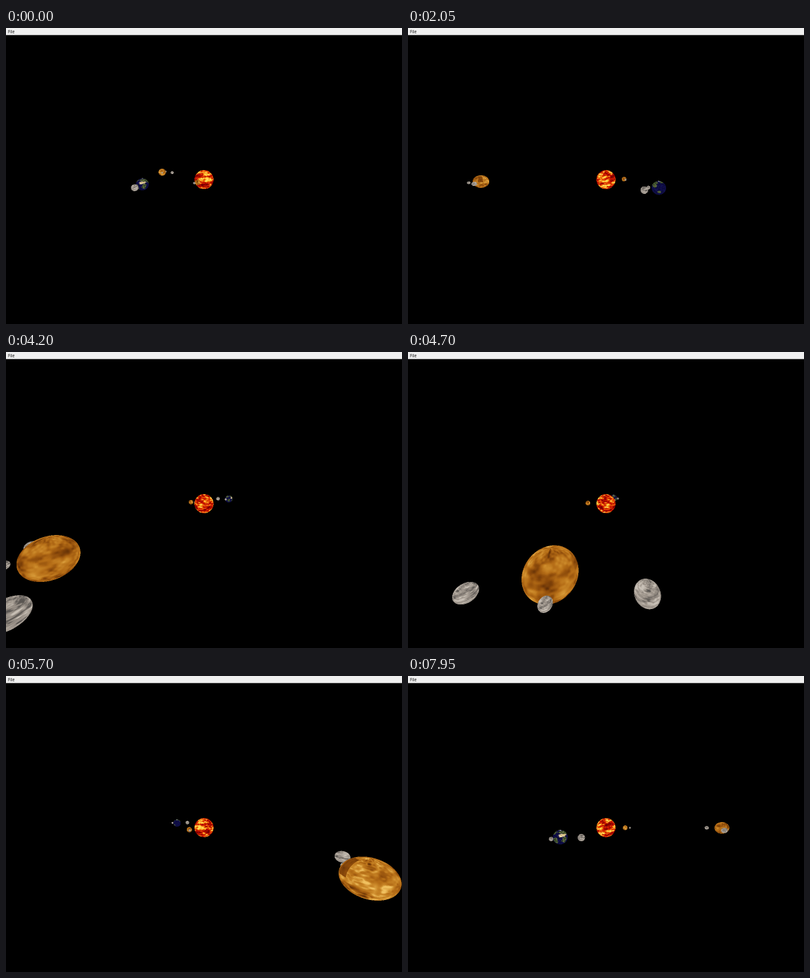
These frames come from a looping animation (600x448 px, 8000 ms). An HTML page with a canvas:

```html
<!DOCTYPE html>
<html lang="en">
<head>
<meta charset="utf-8">
<title>Solar system</title>
<style>
  html, body { margin: 0; width: 100%; height: 100%; overflow: hidden; background: #000; }
  #stage { position: absolute; left: 0; top: 0; width: 600px; height: 448px; }
  canvas { position: absolute; left: 0; top: 11px; }
  #menu {
    position: absolute; left: 0; top: 0; width: 600px; height: 10px;
    background: #f0f0f0; border-bottom: 1px solid #a8a8a8;
    font: 6.3px/11px "Open Sans", "Noto Sans", sans-serif; color: #000;
  }
  #menu span { position: absolute; left: 3px; top: 0; }
</style>
</head>
<body>
<div id="stage">
  <div id="menu"><span>File</span></div>
  <canvas id="space" width="600" height="437"></canvas>
</div>
<script>
const W = 600, H = 437, LOOP = 8000, STEP = 50;
const FOCAL = H / 2;                      // 90 degree vertical field of view
const CAM_Y = 2, CAM_Z = 15, DIST = Math.hypot(CAM_Y, CAM_Z);
const SIN = CAM_Y / DIST, COS = CAM_Z / DIST;
const RAD = Math.PI / 180;

const ctx = document.getElementById("space").getContext("2d");
const image = ctx.createImageData(W, H);
const px = image.data;

// ---- textures ----
const TW = 256, TH = 128;

function hash(x, y, seed) {
  const v = Math.sin(x * 127.1 + y * 311.7 + seed * 74.7) * 43758.5453;
  return v - Math.floor(v);
}

// Value noise over u, v in 0..1 that wraps around in u.
function noise(u, v, nx, ny, seed) {
  const x = u * nx, y = v * ny, ix = Math.floor(x), iy = Math.floor(y);
  const ease = f => f * f * (3 - 2 * f);
  const fx = ease(x - ix), fy = ease(y - iy);
  const at = (i, j) => hash(((ix + i) % nx + nx) % nx, iy + j, seed);
  const top = at(0, 0) + (at(1, 0) - at(0, 0)) * fx;
  const low = at(0, 1) + (at(1, 1) - at(0, 1)) * fx;
  return top + (low - top) * fy;
}

function cloud(u, v, nx, ny, seed) {
  return 0.45 * noise(u, v, nx, ny, seed)
    + 0.3 * noise(u, v, nx * 2, ny * 2, seed + 1)
    + 0.25 * noise(u, v, nx * 4, ny * 4, seed + 2);
}

// Colour from a list of evenly spaced stops.
function ramp(stops, k) {
  const p = Math.min(0.9999, Math.max(0, k)) * (stops.length - 1);
  const i = Math.floor(p), f = p - i;
  return stops[i].map((c, n) => c + (stops[i + 1][n] - c) * f);
}

const contrast = (k, gain) => 0.5 + (k - 0.5) * gain;

// u = 0.5 is longitude 0, v = 0 is the north pole.
function makeTexture(shade) {
  const data = new Uint8ClampedArray(TW * TH * 3);
  for (let j = 0; j < TH; j++)
    for (let i = 0; i < TW; i++)
      data.set(shade(i / TW, j / TH), (j * TW + i) * 3);
  return data;
}

const FIRE = [[120, 0, 0], [170, 5, 0], [205, 22, 0], [228, 70, 5], [250, 160, 25], [255, 225, 90]];
const AMBER = [[85, 40, 5], [140, 74, 10], [180, 108, 22], [204, 138, 42], [240, 192, 95]];
const STONE = [[90, 86, 82], [140, 132, 124], [166, 157, 147], [200, 192, 182]];

const sunTex = makeTexture((u, v) => ramp(FIRE, contrast(cloud(u + v * 0.2, v, 13, 14, 3), 2.3)));

// Bright veins cover one side, a dark wedge marks the other.
const amberTex = makeTexture((u, v) => {
  const k = contrast(cloud(u, v, 12, 8, 11), 1.2) - 0.04;
  const side = Math.max(0, Math.cos((u - 0.67) * 2 * Math.PI));
  const vein = 1 - Math.abs(2 * cloud(u, v, 9, 8, 15) - 1) * 4;
  const wedge = v > 0.15 && v < 0.5 && Math.abs(u - 0.5) < 0.05;
  return ramp(AMBER, wedge ? k * 0.35 : k + 0.35 * side * Math.max(0, vein));
});

const stoneTex = makeTexture((u, v) => ramp(STONE, contrast(cloud(u, v, 9, 16, 31), 2.2)));

// Land masses: longitude, latitude, half width, half height.
const DESERT = [0, 24, 36, 15];
const LAND = [
  [14, -8, 22, 28], [40, 52, 75, 20], [85, 25, 25, 16], [135, -25, 18, 12],
  [-100, 48, 38, 20], [-62, -15, 20, 28], [180, 62, 40, 12]
];

const earthTex = makeTexture((u, v) => {
  const lon = (u - 0.5) * 360, lat = 90 - v * 180;
  const rough = (cloud(u, v, 14, 10, 41) - 0.5) * 1.2;
  const inside = ([x, y, w, h]) => {
    const d = Math.abs(lon - x), wrap = Math.min(d, 360 - d);
    return Math.hypot(wrap / w, (lat - y) / h) + rough < 1;
  };
  const n = noise(u, v, 40, 24, 47);
  if (Math.abs(lat) > 78) return [190, 195, 200];
  if (inside(DESERT)) return ramp([[190, 165, 105], [245, 230, 185]], n);
  if (LAND.some(inside)) return ramp([[28, 48, 22], [70, 88, 48], [145, 135, 92]], n);
  return ramp([[8, 8, 48], [20, 18, 88]], n);
});

// ---- bodies: orbit radius, size, start angle and speed in degrees (per second) ----
const body = (tex, orbit, size, start, speed, turn, spin, moons = []) =>
  ({ tex, orbit, size, start, speed, turn, spin, moons });
const moon = (orbit, size, start, speed) => body(stoneTex, orbit, size, start, speed, 0, 70);

const system = body(sunTex, 0, 1, 0, 0, 20, 55, [
  body(amberTex, 2, 0.25, -17.5, 58.5, 0, 80, [
    moon(0.5, 0.1, -32, 196.5)
  ]),
  body(earthTex, 6, 0.5, -59.8, 48.76, 23, 92, [
    moon(0.73, 0.14, -137.8, 194),
    moon(1.5, 0.25, 2.5, 146.2)
  ]),
  body(amberTex, 12, 0.6, -143.4, 29.25, -83, 58.5, [
    moon(0.9, 0.12, 16.5, 152.6),
    moon(1.5, 0.18, -186.9, 102.4),
    moon(2.1, 0.24, 65, 78.2)
  ])
]);

function place(b, cx, cz, t, out) {
  const a = (b.start + b.speed * t) * RAD;
  const x = cx + b.orbit * Math.sin(a), z = cz + b.orbit * Math.cos(a);
  out.push({ tex: b.tex, r: b.size, spin: b.turn + b.spin * t, x, y: z * SIN, d: DIST - z * COS });
  b.moons.forEach(m => place(m, x, z, t, out));
  return out;
}

// Ray-cast one sphere, with four samples per pixel for a soft rim.
function drawSphere({ tex, r, spin, x, y, d }) {
  if (d < 0.3) return;
  const sx = W / 2 + FOCAL * x / d, sy = H / 2 + FOCAL * y / d;
  const reach = 1.5 * FOCAL * r / d * Math.hypot(1, x / d, y / d) + 2;
  const x0 = Math.max(0, Math.floor(sx - reach)), x1 = Math.min(W, Math.ceil(sx + reach));
  const y0 = Math.max(0, Math.floor(sy - reach)), y1 = Math.min(H, Math.ceil(sy + reach));
  const q = x * x + y * y + d * d - r * r;
  const shift = 0.5 - spin / 360;

  for (let j = y0; j < y1; j++) {
    for (let i = x0; i < x1; i++) {
      let hits = 0, red = 0, green = 0, blue = 0;
      for (let s = 0; s < 4; s++) {
        const vx = (i + 0.25 + (s & 1) * 0.5 - W / 2) / FOCAL;
        const vy = (j + 0.25 + (s >> 1) * 0.5 - H / 2) / FOCAL;
        const a = vx * vx + vy * vy + 1, b = vx * x + vy * y + d;
        const disc = b * b - a * q;
        if (disc < 0) continue;
        const t = (b - Math.sqrt(disc)) / a;
        const nx = (vx * t - x) / r, ny = (vy * t - y) / r, nz = (t - d) / r;
        const up = -ny * COS - nz * SIN, front = ny * SIN - nz * COS;
        let u = Math.atan2(nx, front) / (2 * Math.PI) + shift;
        u -= Math.floor(u);
        const v = Math.acos(Math.max(-1, Math.min(1, up))) / Math.PI;
        const k = (Math.min(TH - 1, Math.floor(v * TH)) * TW + Math.floor(u * TW) % TW) * 3;
        red += tex[k]; green += tex[k + 1]; blue += tex[k + 2];
        hits++;
      }
      if (!hits) continue;
      const p = (j * W + i) * 4, rest = 1 - hits / 4;
      px[p] = px[p] * rest + red / 4;
      px[p + 1] = px[p + 1] * rest + green / 4;
      px[p + 2] = px[p + 2] * rest + blue / 4;
    }
  }
}

function render(ms) {
  new Uint32Array(px.buffer).fill(0);
  for (let p = 3; p < px.length; p += 4) px[p] = 255;
  place(system, 0, 0, ms / 1000, []).sort((a, b) => b.d - a.d).forEach(drawSphere);
  ctx.putImageData(image, 0, 0);
}

const begin = performance.now();
let last = -1;

function tick() {
  const ms = Math.floor((performance.now() - begin) % LOOP / STEP) * STEP;
  if (ms !== last) render(last = ms);
  requestAnimationFrame(tick);
}
tick();
</script>
</body>
</html>
```
